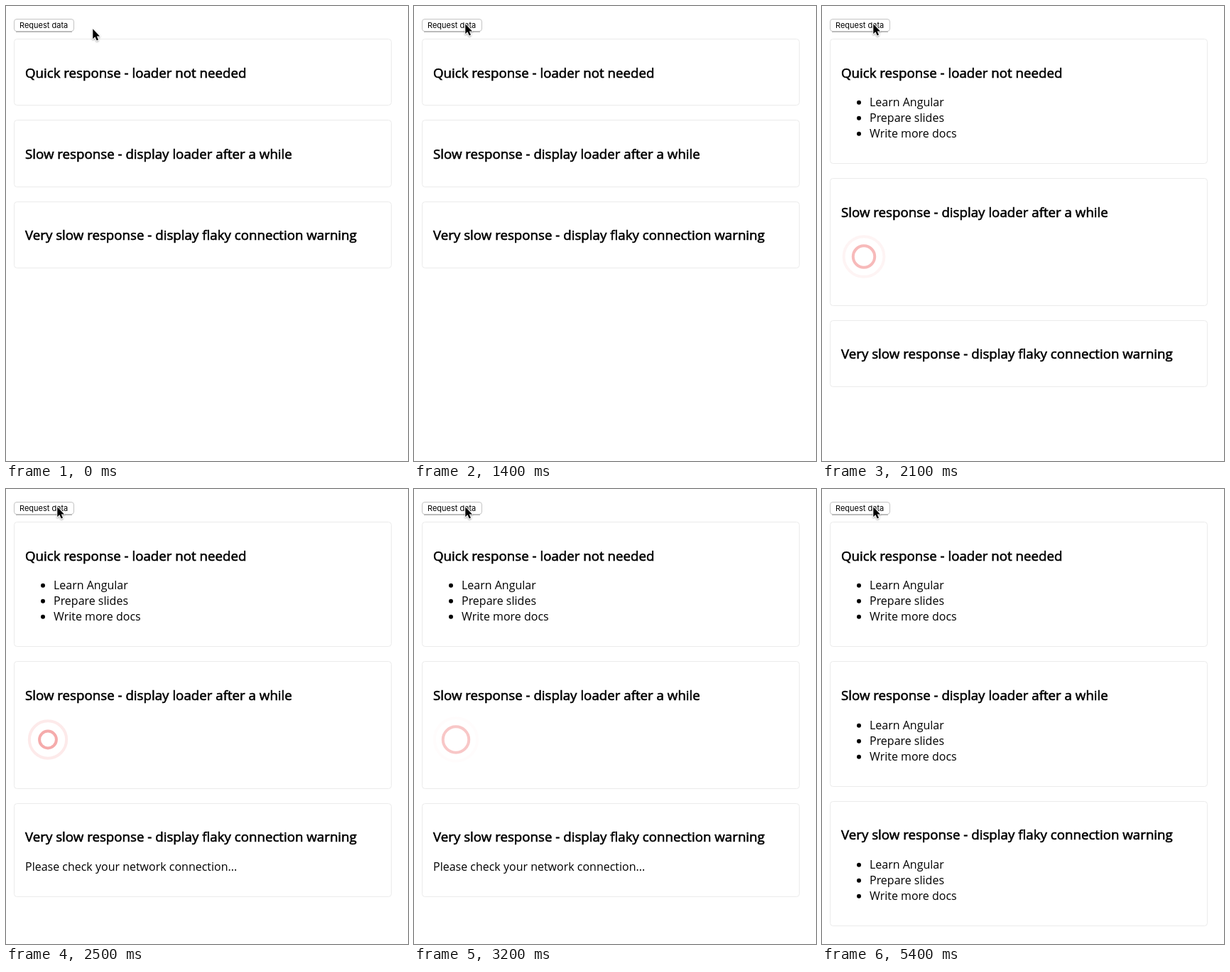
Write an HTML page that moves like this. It is 566x640 px and loops after 6400 ms.

```html
<!DOCTYPE html>
<html lang="en">
<head>
<meta charset="utf-8">
<title>Loader states</title>
<style>
  html, body { margin: 0; width: 100%; height: 100%; overflow: hidden; background: #fff; }
  svg { display: block; }
  text { font: 16px "Open Sans", sans-serif; white-space: pre; }
  .title { font-size: 18.72px; stroke: #000; stroke-width: .6px; }
  .label { font: 11px Inter, sans-serif; }
  .card { fill: #fff; stroke: #ebebeb; }
  .ring { fill: none; stroke: lightcoral; stroke-width: 4px; }
  .pressed .label { fill: #fff; }
  .pressed .face { fill: url(#blue); stroke: #2a7de8; }
  .face { fill: #fff; stroke: #c4c4c4; }
</style>
</head>
<body>
<svg id="stage" width="566" height="640" viewBox="0 0 566 640">
  <defs>
    <linearGradient id="blue" x2="0" y2="1">
      <stop stop-color="#6cb3fa"/>
      <stop offset="1" stop-color="#0a6bfb"/>
    </linearGradient>
    <filter id="shadow" x="-50%" y="-50%" width="200%" height="200%">
      <feDropShadow dx="0" dy="1.2" stdDeviation="1" flood-opacity=".4"/>
    </filter>
  </defs>
  <g id="button">
    <path d="M14 36.4H93" stroke="#a8a8a8" fill="none"/>
    <rect class="face" x="11.5" y="18.5" width="84" height="17" rx="3.5"/>
    <text class="label" x="19" y="31">Request data</text>
  </g>
  <g id="cards"></g>
  <circle id="click" r="20.5" fill="none" stroke="#333" stroke-width="2.5" opacity=".75"/>
  <g id="cursor" filter="url(#shadow)">
    <path d="M.3 .3V14.2L3.4 11.3L5.7 16.6L8 15.6L5.8 10.4H10Z"
      stroke="#fff" stroke-width="1.6" stroke-linejoin="round" paint-order="stroke"/>
  </g>
</svg>
<script>
const LOOP = 6400, TICK = 100;
const HEIGHT = { empty: 94.4, list: 176.4, loader: 179.4, warning: 132.2 };
const ITEMS = ['Learn Angular', 'Prepare slides', 'Write more docs'];
const CARDS = [
  { title: 'Quick response - loader not needed',
    steps: [[0, 'empty'], [1600, 'list']] },
  { title: 'Slow response - display loader after a while',
    steps: [[0, 'empty'], [1700, 'loader'], [3400, 'list']] },
  { title: 'Very slow response - display flaky connection warning',
    steps: [[0, 'empty'], [2400, 'warning'], [5400, 'list']] }
];
const POINTER = [
  [0, 122, 32], [100, 120, 38], [400, 119, 37], [500, 116, 35], [600, 112, 33],
  [700, 106, 30], [800, 98, 28], [900, 90, 27], [1000, 77, 26], [1100, 72, 25]
];
const PRESS = [1300, 1400];
const RIPPLE_START = 1790, RIPPLE = 1000;

const $ = id => document.getElementById(id);

function add(parent, tag, attrs = {}, content = '') {
  const el = document.createElementNS('http://www.w3.org/2000/svg', tag);
  set(el, attrs);
  el.textContent = content;
  return parent.appendChild(el);
}

function set(el, attrs) {
  for (const key in attrs) el.setAttribute(key, attrs[key]);
}

const at = (steps, t) => steps.filter(step => step[0] <= t).pop();
const moveTo = (el, x, y) => set(el, { transform: `translate(${x} ${y})` });
const show = (el, on) => { el.style.display = on ? '' : 'none'; };

// cubic-bezier(0, .2, .8, 1)
function ease(x) {
  let lo = 0, hi = 1, s = .5;
  for (let i = 0; i < 24; i++) {
    s = (lo + hi) / 2;
    if (2.4 * (1 - s) * s * s + s ** 3 < x) lo = s; else hi = s;
  }
  return .6 * (1 - s) ** 2 * s + 3 * (1 - s) * s * s + s ** 3;
}

function buildCard({ title, steps }) {
  const root = add($('cards'), 'g');
  const box = add(root, 'rect', { class: 'card', x: 11.5, width: 531, rx: 4 });
  const heading = add(root, 'text', { class: 'title', x: 27 }, title);
  const body = { list: add(root, 'g'), loader: add(root, 'g'), warning: add(root, 'g') };
  ITEMS.forEach((item, i) => {
    add(body.list, 'circle', { cx: 52, cy: i * 22 - 5.2, r: 3 });
    add(body.list, 'text', { x: 67, y: i * 22 }, item);
  });
  add(body.warning, 'text', { x: 27 }, 'Please check your network connection...');
  const rings = [0, 1].map(() => add(body.loader, 'circle', { class: 'ring', cx: 59, cy: 14.5 }));
  return { steps, box, heading, body, rings };
}

const cards = CARDS.map(buildCard);

function drawCard(card, top, t) {
  const state = at(card.steps, t)[1];
  const bottom = top + HEIGHT[state];
  const y = Math.round(top);
  set(card.box, { y: y + .5, height: Math.round(bottom) - y - 1 });
  set(card.heading, { y: Math.round(top + 54.6) });
  for (const name in card.body) {
    show(card.body[name], name === state);
    moveTo(card.body[name], 0, Math.round(top + 95.45));
  }
  if (state === 'loader') {
    card.rings.forEach((ring, i) => {
      const phase = (t - RIPPLE_START + RIPPLE + i * RIPPLE / 2) % RIPPLE / RIPPLE;
      const grow = ease(phase);
      set(ring, { r: 2 + 29 * grow, opacity: 1 - grow });
    });
  }
  return bottom + 20;
}

function draw(t) {
  cards.reduce((top, card) => drawCard(card, top, t), 46);
  const [, x, y] = at(POINTER, t);
  const pressed = t >= PRESS[0] && t < PRESS[1];
  moveTo($('cursor'), x, y);
  moveTo($('click'), x, y + .5);
  show($('click'), pressed);
  $('button').classList.toggle('pressed', pressed);
}

const start = performance.now();
function frame() {
  const t = (performance.now() - start) % LOOP;
  draw(Math.floor(t / TICK) * TICK);
  requestAnimationFrame(frame);
}
frame();
</script>
</body>
</html>
```
